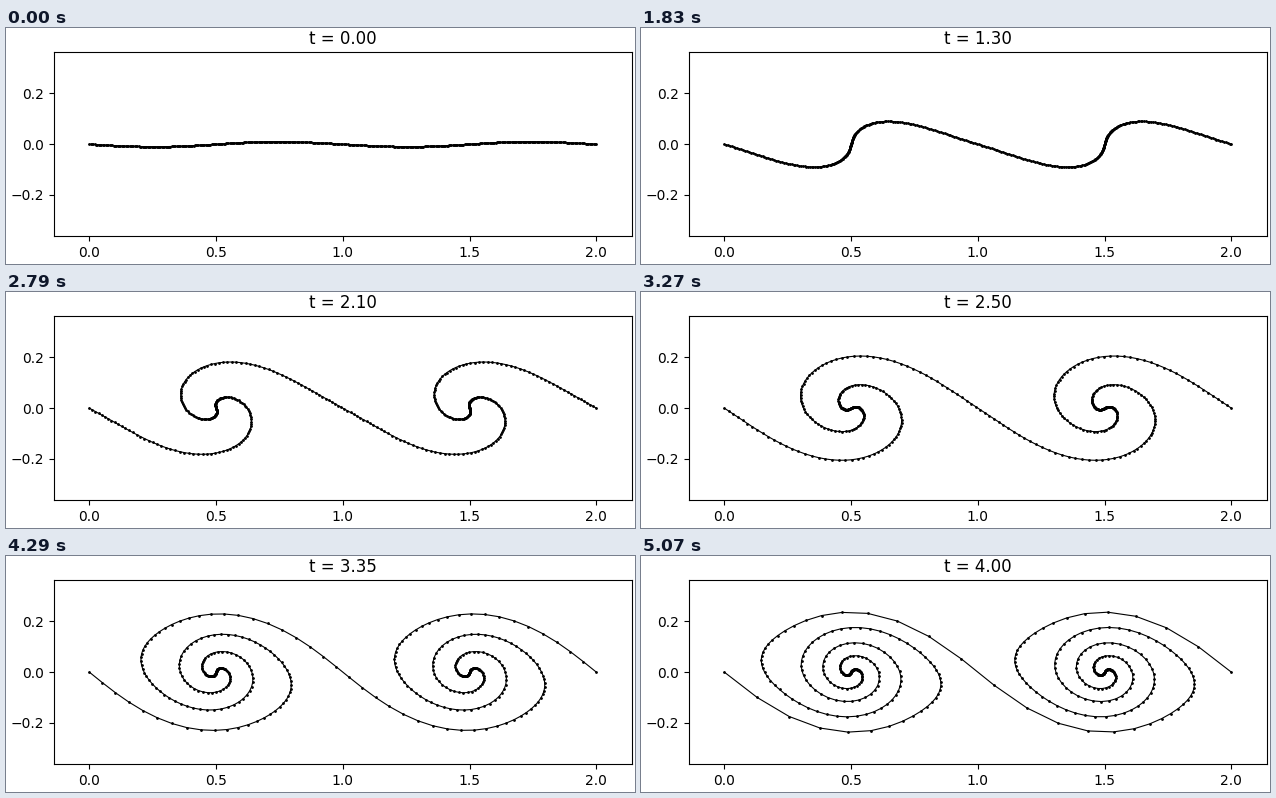
A matplotlib script for the animation above (5730 ms loop, 629x236 px).

```python
"""Roll-up of a periodic vortex sheet, smoothed vortex-blob method."""
import numpy as np
import matplotlib.pyplot as plt
from matplotlib.animation import FuncAnimation

W, H, DPI = 629, 236, 100
N = 400            # vortex blobs over two periods
DELTA = 0.5        # smoothing length
DT, STEPS = 0.05, 80
TICK = 30          # ms
HOLD_START, HOLD_END, TICKS_PER_STEP = 11, 22, 2
TICKS = HOLD_START + (STEPS - 1) * TICKS_PER_STEP + HOLD_END


def velocity(z):
    """Induced velocity of every blob; z holds the rows x and y."""
    x, y = 2 * np.pi * z
    c, s = np.cos(x), np.sin(x)
    ch, sh = np.cosh(y), np.sinh(y)
    cos_dx = np.outer(c, c) + np.outer(s, s)
    sin_dx = np.outer(s, c) - np.outer(c, s)
    cosh_dy = np.outer(ch, ch) - np.outer(sh, sh)
    sinh_dy = np.outer(sh, ch) - np.outer(ch, sh)
    q = cosh_dy - cos_dx + DELTA**2
    return np.array([-(sinh_dy / q).sum(1), (sin_dx / q).sum(1)]) / (2 * N)


def rk4(z, dt):
    k1 = velocity(z)
    k2 = velocity(z + dt / 2 * k1)
    k3 = velocity(z + dt / 2 * k2)
    k4 = velocity(z + dt * k3)
    return z + dt / 6 * (k1 + 2 * k2 + 2 * k3 + k4)


def simulate():
    g = np.linspace(0, 2, N)
    bump = 0.01 * np.sin(2 * np.pi * g)
    states = [np.array([g + bump, -bump])]
    for _ in range(STEPS):
        states.append(rk4(states[-1], DT))
    return states


states = simulate()

fig = plt.figure(figsize=(W / DPI, H / DPI), dpi=DPI)
left, top, width, height = 47.85, 24.15, 578, 184   # axes box in pixels
ax = fig.add_axes([left / W, 1 - (top + height) / H, width / W, height / H])
scale = 253.5      # pixels per unit on both axes
half_w, half_h = width / 2 / scale, height / 2 / scale
ax.set_xlim(1 - half_w, 1 + half_w)
ax.set_ylim(-half_h, half_h)
ax.set_xticks([0, 0.5, 1, 1.5, 2])
ax.set_yticks([-0.2, 0, 0.2])
sheet, = ax.plot([], [], "k.-", lw=0.8, ms=2)
title = ax.set_title("")


def update(tick):
    step = min(max((tick - HOLD_START) // TICKS_PER_STEP + 1, 0), STEPS)
    sheet.set_data(*states[step])
    title.set_text(f"t = {step * DT:.2f}")
    return sheet, title


anim = FuncAnimation(fig, update, frames=TICKS, interval=TICK, repeat=True,
                     repeat_delay=0, blit=False)
plt.show()
```
